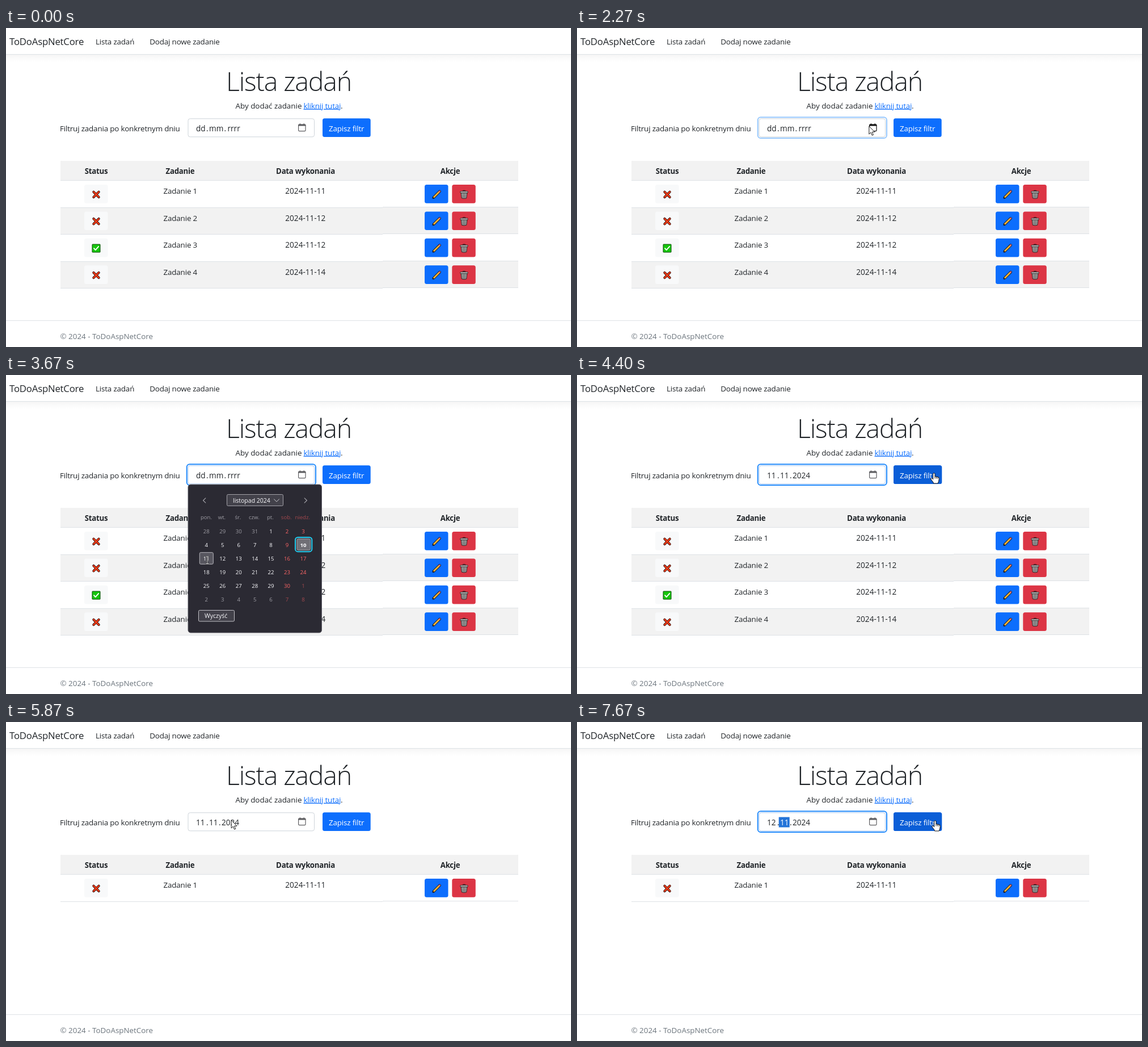
These frames come from a looping animation (996x562 px, 8000 ms). An HTML page:

```html
<!DOCTYPE html>
<html lang="pl">
<head>
<meta charset="utf-8">
<title>Lista zadań</title>
<style>
html, body { margin: 0; width: 100%; height: 100%; overflow: hidden; background: #fff; }
svg { display: block; }
text { font: 13.4px "Open Sans", "Noto Sans", sans-serif; letter-spacing: -.012em; fill: #212529; white-space: pre; }
.mid { text-anchor: middle; }
.num { font-size: 13.6px; letter-spacing: 0; }
.loose { letter-spacing: 0; }
.brand { font-size: 16.75px; }
.title { font-size: 46.5px; font-weight: 300; letter-spacing: -.026em; }
.head { font-size: 13.25px; font-weight: 700; letter-spacing: -.02em; }
.white { fill: #fff; }
.link { fill: #0d6efd; text-decoration: underline; }
.muted { fill: #6c757d; }
#popup text { font-size: 9.6px; letter-spacing: 0; fill: #fbfbfe; }
#popup .ctl { font-size: 10.5px; }
#popup .off { fill: #9d9ca3; }
#popup .red { fill: #ff6666; }
#popup .dim { fill: #a3484e; }
#popup .today { font-weight: 700; }
.line { fill: none; stroke-linecap: round; stroke-linejoin: round; }
</style>
</head>
<body>
<svg id="stage" width="996" height="562" viewBox="0 0 996 562"></svg>
<script>
const LOOP = 8000, STEP = 1000 / 15;

const text = (x, y, s, cls = '', id = '') =>
  `<text x="${x}" y="${y}" class="${cls}" ${id && `id="${id}"`}>${s}</text>`;
const rect = (x, y, w, h, fill, r = 0, more = '') =>
  `<rect x="${x}" y="${y}" width="${w}" height="${h}" rx="${r}" fill="${fill}" ${more}/>`;
const line = (d, color, width) =>
  `<path class="line" d="${d}" stroke="${color}" stroke-width="${width}"/>`;
const at = (x, y, body) => `<g transform="translate(${x} ${y})">${body}</g>`;
// White gap plus blue band, as a box-shadow focus ring
const ring = (id, x, y, w, h) => `<g id="${id}">` +
  rect(x - 2, y - 2, w + 4, h + 4, 'none', 5, 'stroke="#258cfb" stroke-width="2"') + '</g>';

// Icons, centred on the origin
const CROSS = 'M-4.6 -4.6 L4.6 4.6 M4.6 -4.6 L-4.6 4.6';
const cross = line(CROSS, '#2a0d08', 4.2) + line(CROSS, '#f03a17', 2.6);
const check = rect(-7, -7, 14, 14, '#16c60c', .5, 'stroke="#0b4a08"') + line('M-4 0 L-1.3 3 L4.2 -3.2', '#fff', 1.8);
const pencil = line('M-5 5 L5.4 -5.4', '#1d1712', 4.5) + line('M-4.4 4.4 L4.2 -4.2', '#fdb43a', 2.8) +
  line('M4.8 -4.8 L5.6 -5.6', '#f0787a', 2.6) + '<path d="M-7.6 7.6 L-6.6 4.4 L-4.4 6.6Z" fill="#1d1712"/>';
const bin = '<path d="M-5.4 -3.5 H5.4 L4.2 6.5 Q0 8 -4.2 6.5Z" fill="#a3a3a3" stroke="#1c1c1c" stroke-width=".9"/>' +
  line('M-2.3 -1.5 L-1.9 5.5 M0 -1.5 V6 M2.3 -1.5 L1.9 5.5', '#555', .8) +
  rect(-6.8, -5.6, 13.6, 2.8, '#c4c4c4', 1.3, 'stroke="#1c1c1c" stroke-width=".9"') +
  line('M-2 -6 V-7 H2 V-6', '#1c1c1c', 1);

const LEFT = 96, SPLIT = 664, RIGHT = 903, PITCH = 47.4;
function row(i, date, done) {
  const dy = i * PITCH, edge = n => Math.round(269 + n * PITCH + (n ? .6 : 0));
  const half = (x, w, up) => {
    const top = edge(i) - (i ? up : 0), bottom = edge(i + 1) - up;
    return rect(x, top, w, bottom - top, i % 2 ? '#f2f2f2' : '#fff') + rect(x, bottom - 1, w, 1, '#dee2e6');
  };
  const y = 276 + dy;
  return half(LEFT, SPLIT - LEFT, 0) + half(SPLIT, RIGHT - SPLIT, 1) +
    rect(138, y, 41.5, 32.7, '#f8f9fa', 3.5) + at(159, y + 17.3, done ? check : cross) +
    text(307.3, 292.4 + dy, 'Zadanie ' + (i + 1), 'mid') +
    text(527.8, 292.4 + dy, date, 'mid num') +
    rect(738, y, 41.5, 32.7, '#0d6efd', 3.5) + at(759, y + 17.3, pencil) +
    rect(786.3, y, 41.5, 32.7, '#dc3545', 3.5) + at(807.5, y + 17.3, bin);
}

const COL = 28.45, DAY_X = 353.3, DAY_Y = 275, DAY_H = 24.1;
const cellX = c => DAY_X + c * COL, cellY = r => DAY_Y + r * DAY_H;
function calendar() {
  let s = rect(321, 193, 235.5, 261, '#2b2a33', 4.5, 'stroke="#5b5a64" stroke-width=".9"') +
    line('M351.8 216.8 L347.6 221 L351.8 225.2 M526.2 216.8 L530.4 221 L526.2 225.2', '#a6a5ac', 1.1) +
    rect(389.5, 210.5, 99, 20, '#42414a', 2, 'stroke="#a3a2a9"') +
    text(400, 224.8, 'listopad 2024', 'ctl') +
    line('M472.5 218.8 L477 223.2 L481.5 218.8', '#c9c9ce', 1) +
    rect(339.5, 414.5, 63, 19.5, '#42414a', 2, 'stroke="#c2c1c7"') +
    text(350, 428.2, 'Wyczyść', 'ctl') +
    rect(341.5, 312.5, 24, 20.5, '#57565f', 2, 'id="hover" stroke="#b8b7bd"') +
    rect(510, 286, 29.3, 25.2, '#2b2a33', 4.5, 'stroke="#22cdf0" stroke-width="2"') +
    rect(512.8, 288.6, 23.8, 20, '#706f76', 2, 'stroke="#a5a4aa"');
  ['pon.', 'wt.', 'śr.', 'czw.', 'pt.', 'sob.', 'niedz.'].forEach((d, c) =>
    s += text(cellX(c) - (c ? 1.3 : .3), 254.2, d, 'mid ' + (c > 4 ? 'dim' : 'off')));
  for (let i = 0; i < 42; i++) {
    const c = i % 7, d = i - 3, inside = d > 0 && d < 31;
    const n = d < 1 ? d + 31 : d > 30 ? d - 30 : d;
    // Weekend days before the current month keep the plain weekend colour
    const cls = d === 10 ? 'today' : c > 4 ? (inside ? 'red' : 'dim') : inside ? '' : 'off';
    s += text(cellX(c), cellY(i / 7 | 0) + 3.5, n, 'mid ' + cls);
  }
  return s;
}

const BEAM = 'M-2.5 -6 H2.5 M0 -6 V6.5 M-2.5 6.5 H2.5';
const cursors = {
  arrow: '<path d="M0 0 V14 L3.2 11 L5.4 16.2 L7.6 15.2 L5.4 10.2 H9.9Z" fill="#fff" stroke="#111" stroke-width=".95"/>',
  beam: line(BEAM, '#222', 2.2) + line(BEAM, '#d8d8dc', 1),
  hand: '<path d="M-2.3 .8 Q-.7 -1.4 1 .8 V5.6 L6.5 6.8 Q8.6 7.4 8.4 9.6 L7.6 14.2 L6.2 18 H-1.6 L-2 16 L-6 11 Q-6.8 8.6 -4.4 8.8 L-2.3 10.8Z" fill="#fff" stroke="#111"/>' +
    line('M1 5.6 V9 M3.5 6.6 V9.2 M6 7.2 V9.6', '#111', .9)
};

document.getElementById('stage').innerHTML =
  '<defs><linearGradient id="shade" x2="0" y2="1"><stop stop-opacity=".04"/><stop offset=".5" stop-opacity=".017"/>' +
  '<stop offset="1" stop-opacity="0"/></linearGradient></defs>' +
  rect(0, 0, 996, 562, '#fff') + rect(0, 47, 996, 13, 'url(#shade)') + rect(0, 46, 996, 1, '#dee2e6') +
  text(6, 30, 'ToDoAspNetCore', 'brand') +
  text(158, 28.5, 'Lista zadań') + text(253.2, 28.5, 'Dodaj nowe zadanie') +
  text(498.5, 110.5, 'Lista zadań', 'title mid') +
  text(404.5, 141.5, 'Aby dodać zadanie', 'loose') + text(524.5, 141.5, 'kliknij tutaj', 'link') + text(590, 141.5, '.') +
  text(95, 182, 'Filtruj zadania po konkretnym dniu') +
  ring('inputRing', 320.7, 159.3, 223.3, 32.7) +
  rect(321, 159.8, 222.5, 32, '#fff', 3.5, 'id="field" stroke="#ced4da"') +
  rect(0, 167.5, 19, 18, '#2474d8', 0, 'id="mark"') +
  text(335, 182, '', 'num', 'dd') + text(353, 182, '.', 'num') +
  text(358, 182, '', 'num', 'mm') + text(0, 182, '.', 'num', 'dot') + text(0, 182, '', 'num', 'yy') +
  '<g id="icon">' + rect(515.6, 170.2, 12.4, 11.4, 'none', 1.6, 'stroke="currentColor" stroke-width="1.2"') +
  rect(515.2, 169.8, 13.2, 2.8, 'currentColor', 1) + line('M518.4 168.6 V170.5 M525.2 168.6 V170.5', 'currentColor', 1.3) + '</g>' +
  ring('buttonRing', 558, 159.3, 85, 32.7) +
  rect(558, 159.3, 84.7, 32.7, '#0d6efd', 3.5) + rect(558, 159.3, 85.3, 32.7, '#0b5ed7', 3.5, 'id="buttonHover"') +
  text(569, 182, 'Zapisz filtr', 'white') +
  rect(LEFT, 234, RIGHT - LEFT, 34, '#f2f2f2') + rect(LEFT, 268, RIGHT - LEFT, 1, '#dee2e6') +
  [[159, 'Status'], [307, 'Zadanie'], [528, 'Data wykonania'], [783, 'Akcje']]
    .map(([x, s]) => text(x, 257, s, 'head mid')).join('') +
  row(0, '2024-11-11') +
  `<g id="rest">${row(1, '2024-11-12') + row(2, '2024-11-12', true) + row(3, '2024-11-14')}</g>` +
  rect(0, 515, 996, 1, '#dee2e6') + text(95.5, 547.5, '© 2024 - ToDoAspNetCore', 'muted loose') +
  `<g id="popup">${calendar()}</g>` +
  '<g id="cursor">' + Object.entries(cursors).map(([k, s]) => `<g id="${k}">${s}</g>`).join('') + '</g>';

const el = {};
document.querySelectorAll('[id]').forEach(e => el[e.id] = e);

// Pointer route: time, x, y
const route = [
  [1000, 985, 241], [1130, 925, 224], [1330, 700, 190], [1470, 545, 177], [1600, 447, 174],
  [1800, 372, 170], [1930, 398, 172], [2270, 516, 173], [2800, 516, 173], [3070, 480, 235],
  [3400, 378, 328], [3530, 356, 326], [3800, 354, 326], [4000, 425, 270], [4270, 605, 180],
  [4400, 630, 173], [5200, 630, 173], [5400, 683, 172], [5600, 570, 172], [5870, 395, 173],
  [6070, 351, 174], [6270, 343, 177], [6530, 340, 194], [7130, 340, 194], [7400, 480, 189],
  [7600, 621, 176], [7660, 632, 174]
];
function pointer(t) {
  const i = route.findIndex(p => p[0] > t);
  if (i < 0) return route[route.length - 1].slice(1);
  const [t0, x0, y0] = route[Math.max(i - 1, 0)], [t1, x1, y1] = route[i];
  const k = i ? (t - t0) / (t1 - t0) : 0;
  return [x0 + (x1 - x0) * k, y0 + (y1 - y0) * k];
}

const within = (t, a, b) => t >= a && t < b;
const ramp = (t, a, d = 140) => Math.min(1, Math.max(0, (t - a) / d));
const show = (e, on) => e.setAttribute('visibility', on ? 'visible' : 'hidden');
const fade = (e, v) => e.setAttribute('opacity', v);
const fill = (e, v) => e.style.fill = v;

function draw(t) {
  const [x, y] = pointer(t);
  const overButton = within(x, 558, 643) && within(y, 159, 192);
  const open = within(t, 2270, 3795);
  const shape = overButton ? 'hand' : within(t, 3520, 3795) ? 'beam' : 'arrow';
  show(el.cursor, t >= 995);
  el.cursor.setAttribute('transform', `translate(${x} ${y})`);
  for (const k in cursors) el[k].style.display = k === shape ? '' : 'none';

  const focus = ramp(t, 2200) - ramp(t, 4440) + ramp(t, 6200);
  fade(el.inputRing, focus);
  el.field.setAttribute('stroke', focus > .5 ? '#a9c8f0' : '#ced4da');
  fade(el.buttonRing, within(t, 4440, 4590) ? ramp(t, 4400) : 0);
  fade(el.buttonHover, ramp(t, 4220) - ramp(t, 5240) + ramp(t, 7500));

  // Date parts
  const set = t >= 3730, day = within(t, 6795, 7125) ? '01' : t >= 7125 ? '12' : '11';
  el.dd.textContent = set ? day : 'dd';
  el.mm.textContent = set ? '11' : 'mm';
  el.yy.textContent = set ? '2024' : 'rrrr';
  el.dot.setAttribute('x', set ? 375 : 384.5);
  el.yy.setAttribute('x', set ? 380 : 390.5);
  const onDay = within(t, 6260, 7125), onMonth = t >= 7125;
  show(el.mark, onDay || onMonth);
  el.mark.setAttribute('x', onMonth ? 355.7 : 332.7);
  fill(el.dd, onDay ? '#fff' : '');
  fill(el.mm, onMonth ? '#fff' : '');
  el.icon.style.color = within(x, 513, 531) && within(y, 165, 185) && within(t, 2100, 2900) ? '#111' : '#5c5c5f';

  // Calendar
  show(el.popup, open);
  fade(el.popup, ramp(t, 2270));
  const c = Math.round((x - DAY_X) / COL), r = Math.round((y - DAY_Y) / DAY_H);
  show(el.hover, open && within(c, 0, 7) && within(r, 0, 6));
  el.hover.setAttribute('x', cellX(c) - 12);
  el.hover.setAttribute('y', cellY(r) - 10.5);

  show(el.rest, t < 4595);
}

function tick() {
  const t = performance.now() % LOOP;
  draw(Math.floor((t + 4) / STEP) * STEP);
  requestAnimationFrame(tick);
}
tick();
</script>
</body>
</html>
```
